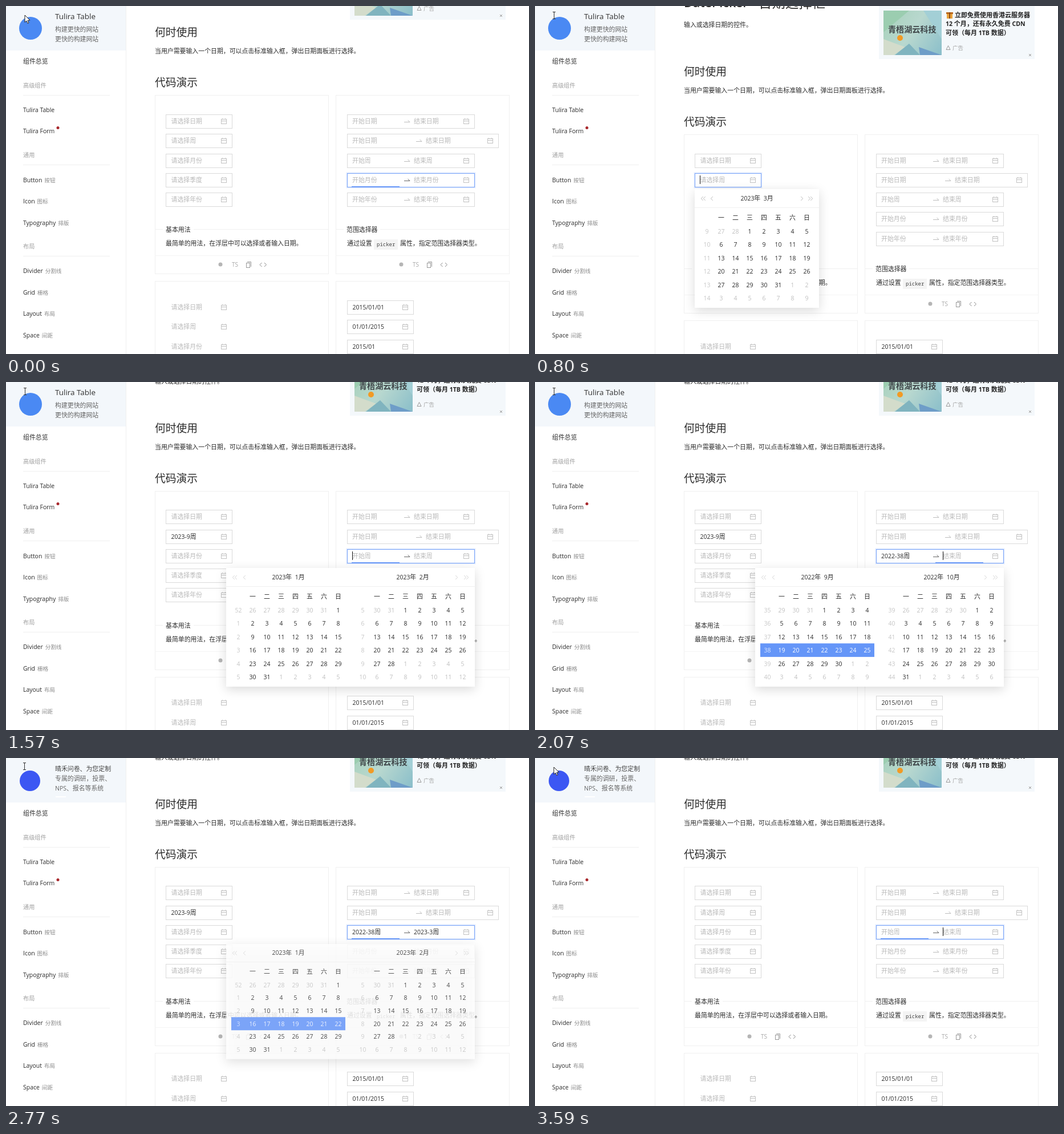
These frames come from a looping animation (917x610 px, 4190 ms). An HTML page with a canvas:

```html
<!DOCTYPE html>
<html lang="zh-CN">
<head>
<meta charset="utf-8">
<title>Date picker demo</title>
<style>
html, body { margin: 0; width: 100%; height: 100%; overflow: hidden; background: #fff; }
canvas { display: block; width: 917px; height: 610px; }
</style>
</head>
<body>
<canvas id="stage" width="917" height="610"></canvas>
<script>
const ctx = document.getElementById('stage').getContext('2d');
const LOOP = 4190;
const SANS = '"Open Sans","Noto Sans CJK SC","Noto Sans CJK",sans-serif';
const CJK = '"Noto Sans CJK SC","Noto Sans CJK","Noto Sans CJK JP",sans-serif';
const MONO = '"Noto Sans Mono","DejaVu Sans Mono",monospace';
const INK = '#2b2b2b', HINT = '#b9b9b9', BLUE = '#6596f8', LINE = '#f0f0f0', ICON = '#c2c2c2';
const BODY = 10.9;

// Each step changes a part of the state and holds until the next one.
const steps = [
  [0, { scroll: 68.6, focus: 'R3', part: 0, caret: '', hover: 'none', week: '', from: '', to: '',
        pop: '', alpha: 1, squash: 1, month: 0, row: -1, mark: 'hover', arrow: true, cy: 16 }],
  [500, { scroll: 0, caret: 'end', hover: 'R1', arrow: false }],
  [600, { focus: 'L1', caret: 'left', hover: 'none' }],
  [700, { pop: 'single', alpha: .6, squash: .92, month: 2 }],
  [800, { alpha: 1, squash: 1 }],
  [950, { row: 0 }],
  [1050, { week: '2023-9周', mark: 'pick' }],
  [1150, { alpha: .87, squash: .97 }],
  [1250, { pop: '', caret: '' }],
  [1370, { scroll: 34.3 }],
  [1470, { hover: 'R2' }],
  [1570, { focus: 'R2', caret: 'start', hover: 'none', pop: 'range', alpha: 1, squash: 1, month: 0, row: -1, mark: 'hover' }],
  [1670, { month: -2 }],
  [1770, { month: -4 }],
  [1870, { row: 3, from: '2022-38周' }],
  [1970, { mark: 'pick' }],
  [2070, { part: 1, caret: 'end' }],
  [2170, { month: -3, row: -1 }],
  [2270, { month: -2 }],
  [2370, { month: -1 }],
  [2470, { month: 0, row: 1, mark: 'edge', to: '2023-1周' }],
  [2570, { row: 3, to: '2023-3周' }],
  [2670, { mark: 'pick', part: 0, caret: '' }],
  [2770, { alpha: .85, squash: .97, cy: 14 }],
  [2870, { pop: '' }],
  [2970, { scroll: 0 }],
  [3090, { hover: 'L0' }],
  [3190, { hover: 'L1' }],
  [3290, { scroll: 34.3, week: '' }],
  [3390, { hover: 'none', from: '', to: '' }],
  [3590, { caret: 'end', arrow: true, cy: 16 }]
];

let s, Y;

function rect(x, y, w, h, color) {
  ctx.fillStyle = color;
  ctx.fillRect(x, y, w, h);
}

function path(color, pts, width = 1, fill) {
  ctx.beginPath();
  pts.forEach(([x, y], i) => i ? ctx.lineTo(x, y) : ctx.moveTo(x, y));
  if (fill) {
    ctx.fillStyle = color;
    ctx.fill();
  } else {
    ctx.strokeStyle = color;
    ctx.lineWidth = width;
    ctx.stroke();
  }
}

function dot(x, y, r, color) {
  ctx.fillStyle = color;
  ctx.beginPath();
  ctx.arc(x, y, r, 0, 7);
  ctx.fill();
}

function frame(x, y, w, h, color) {
  ctx.strokeStyle = color;
  ctx.lineWidth = 1;
  ctx.strokeRect(x + .5, y + .5, w - 1, h - 1);
}

// Latin runs are set a little smaller than the Chinese ones.
function runs(str, size, weight) {
  return (str.match(/[\u2e80-\uffef]+|[^\u2e80-\uffef]+/g) || []).map(part => {
    const wide = part.charCodeAt(0) > 0x2e7f;
    const font = `${weight} ${wide ? size : size * .96}px ${wide ? CJK : SANS}`;
    ctx.font = font;
    return { part, font, width: ctx.measureText(part).width };
  });
}

function text(str, x, y, color = INK, size = BODY, weight = 400, align = 0) {
  const list = runs(str, size, weight);
  const total = list.reduce((sum, r) => sum + r.width, 0);
  x -= total * align;
  ctx.fillStyle = color;
  for (const r of list) {
    ctx.font = r.font;
    ctx.fillText(r.part, x, y + size * .37);
    x += r.width;
  }
  return x;
}

function calendarIcon(x, y) {
  frame(x, y - 4, 10, 9, ICON);
  rect(x + 1, y - 1, 8, 1, ICON);
  rect(x + 2, y - 5, 1, 2, ICON);
  rect(x + 7, y - 5, 1, 2, ICON);
}

function box(x, y, w, id) {
  const on = s.focus === id;
  if (on) {
    ctx.strokeStyle = 'rgba(101,150,248,.18)';
    ctx.lineWidth = 1.5;
    ctx.strokeRect(x - .7, y - .7, w + 1.4, 26.4);
  }
  rect(x, y, w, 25, '#fff');
  frame(x, y, w, 25, on ? '#76a2f8' : s.hover === id ? '#b3c8e2' : '#dadada');
}

const caret = (x, y) => rect(Math.round(x), y - 8, 1, 15, '#111');

function single(x, y, id, hint, value, bare) {
  const cy = y + 12;
  const on = s.focus === id;
  if (!bare) box(x, y, 117, id);
  const end = text(value || hint, x + 9.5, cy, value ? INK : HINT);
  if (on && s.caret === 'left') caret(value ? end : x + 9, cy);
  if (on && value) {
    dot(x + 101.5, cy + .5, 5.5, '#a8a8a8');
    path('#fff', [[x + 99.5, cy - 1.5], [x + 103.5, cy + 2.5]]);
    path('#fff', [[x + 103.5, cy - 1.5], [x + 99.5, cy + 2.5]]);
  } else calendarIcon(x + 97, cy);
}

function range(y, id, unit, w, from, to) {
  const x = 598, cy = y + 12, on = s.focus === id;
  const mid = w > 230 ? 719 : 698, right = mid + 17;
  box(x, y, w, id);
  const a = text(from || '开始' + unit, x + 9, cy, from ? INK : HINT);
  const b = text(to || '结束' + unit, right, cy, to ? INK : HINT);
  path(on ? '#666' : '#bdbdbd', [[mid, cy + 1.5], [mid + 10, cy + 1.5], [mid + 6.5, cy - 2]]);
  calendarIcon(x + w - 20, cy);
  if (!on) return;
  rect(s.part ? 702 : 606, y + 23, 84, 2, BLUE);
  if (s.caret === 'start') caret(from ? a : x + 9, cy);
  if (s.caret === 'end') caret(to ? b : right, cy);
}

function footer(x, y) {
  dot(x, y, 3.5, '#b5b5b5');
  text('TS', x + 20, y, '#a8a8a8', 10.5);
  frame(x + 45, y - 3, 7, 9, '#999');
  path('#999', [[x + 47, y - 4.5], [x + 53.5, y - 4.5], [x + 53.5, y + 4]]);
  path('#888', [[x + 72.5, y - 3], [x + 69, y + .5], [x + 72.5, y + 4]]);
  path('#888', [[x + 77, y - 3], [x + 80.5, y + .5], [x + 77, y + 4]]);
}

function card(x, y, title) {
  frame(x, y, 305, 314, LINE);
  if (!title) return;
  rect(x, y + 235, 14, 1, LINE);
  const end = text(title, x + 19, y + 236);
  const next = Math.round(end + 5);
  rect(next, y + 235, x + 305 - next, 1, LINE);
  rect(x, y + 281, 305, 1, '#f4f4f4');
  footer(x + 115, y + 297);
}

function advert() {
  const y = Y(0);
  rect(603, y - 4, 273, 97, '#f4f8fb');
  ctx.save();
  ctx.translate(611, y + 8);
  ctx.beginPath();
  ctx.rect(0, 0, 102, 78);
  ctx.clip();
  const g = ctx.createLinearGradient(0, 0, 102, 70);
  g.addColorStop(0, '#a5d0b9');
  g.addColorStop(.5, '#b9d8cf');
  g.addColorStop(1, '#8dc0ca');
  rect(0, 0, 102, 78, g);
  path('#9bcdb0', [[0, 0], [45, 0], [0, 38]], 1, true);
  path('#a3cfd6', [[70, 0], [102, 0], [102, 50]], 1, true);
  path('#d3dccb', [[0, 50], [38, 64], [18, 78], [0, 78]], 1, true);
  path('#80b4bf', [[20, 78], [45, 58], [64, 78]], 1, true);
  path('#6e9dc8', [[62, 64], [102, 78], [64, 78]], 1, true);
  ctx.restore();
  text('青梧湖云科技', 619, y + 41, '#3f4649', 14.1, 700);
  dot(640, y + 56, 5, '#f29a24');
  rect(722, y + 12, 10, 10, '#e9a23b');
  rect(721, y + 11, 12, 3, '#b9671d');
  rect(726, y + 11, 2, 11, '#8a4a18');
  text('立即免费使用香港云服务器', 736, y + 16, '#222', 11, 700);
  text('12 个月，还有永久免费 CDN', 720, y + 31, '#222', 11, 700);
  text('可领（每月 1TB 数据）', 720, y + 47, '#222', 11, 700);
  path('#999', [[721, y + 76.5], [724.5, y + 69.5], [728, y + 76.5], [721, y + 76.5]]);
  text('广告', 732, y + 73, '#a5a5a5', 9.5);
  path('#999', [[866, y + 84], [870, y + 88]]);
  path('#999', [[870, y + 84], [866, y + 88]]);
}

function page() {
  Y = y => Math.round(y - s.scroll);
  const top = (base, i) => Math.floor(base + 34 + 34.3 * i - s.scroll);
  text('DatePicker', 261, Y(-6), INK, 22.4, 600);
  text('日期选择框', 392, Y(-6), INK, 23.4, 500);
  text('输入或选择日期的控件。', 261, Y(33));
  text('何时使用', 261, Y(115), INK, 18.8);
  text('当用户需要输入一个日期，可以点击标准输入框，弹出日期面板进行选择。', 261, Y(148));
  text('代码演示', 261, Y(203), INK, 18.8);
  advert();

  card(261, Y(225), '基本用法');
  text('最简单的用法，在浮层中可以选择或者输入日期。', 280, Y(485));
  card(578, Y(225), '范围选择器');
  text('通过设置', 598, Y(485));
  rect(645, Y(478), 42, 18, '#f4f4f4');
  ctx.font = '9px ' + MONO;
  ctx.fillStyle = '#444';
  ctx.fillText('picker', 650, Y(490));
  text('属性，指定范围选择器类型。', 691, Y(485));

  ['日期', '周', '月份', '季度', '年份'].forEach((unit, i) =>
    single(280, top(225, i), 'L' + i, '请选择' + unit, i === 1 ? s.week : ''));
  ['日期', '日期', '周', '月份', '年份'].forEach((unit, i) => {
    const own = i === 2;
    range(top(225, i), 'R' + i, unit, i === 1 ? 266 : 224, own ? s.from : '', own ? s.to : '');
  });

  card(261, Y(551));
  card(578, Y(551));
  ['日期', '周', '月份'].forEach((unit, i) => single(280, top(551, i), 'B' + i, '请选择' + unit, '', true));
  ['2015/01/01', '01/01/2015', '2015/01'].forEach((v, i) => single(598, top(551, i), 'F' + i, '', v));
}

function isoWeek(y, m, d) {
  const thu = new Date(y, m, d + 3);
  return 1 + Math.floor(Math.round((thu - new Date(thu.getFullYear(), 0, 1)) / 864e5) / 7);
}

function chevrons(x, y, n, dir, color) {
  for (let i = 0; i < n; i++) {
    const px = x + (n > 1 ? i * 4 - 2 : 0);
    path(color, [[px - dir * 1.8, y - 3.5], [px + dir * 1.8, y], [px - dir * 1.8, y + 3.5]]);
  }
}

function panel(x, y, month, active) {
  const first = new Date(2023, month, 1);
  const year = first.getFullYear(), m = first.getMonth();
  const lead = (first.getDay() + 6) % 7;
  text(`${year}年  ${m + 1}月`, x + 109, y + 16, INK, BODY, 400, .5);
  rect(x, y + 32, 218, 1, LINE);
  [...'一二三四五六日'].forEach((d, i) => text(d, x + 46.5 + 25 * i, y + 50, INK, BODY, 400, .5));
  const strong = s.mark !== 'hover';
  for (let r = 0; r < 6; r++) {
    const cy = y + 74 + 23.4 * r;
    const on = active && r === s.row;
    const start = 1 - lead + 7 * r;
    if (on) rect(x + 9, cy - 12, 200, 23.7, { hover: '#f3f3f3', edge: '#bdd0fb', pick: BLUE }[s.mark]);
    else if (active && s.pop === 'range' && s.part && month === 0 && r < s.row)
      rect(x + 34, cy - 9.4, 175, 18.8, '#f4f7f6');
    text('' + isoWeek(year, m, start), x + 21.5, cy, on && strong ? '#dfe9ff' : '#c6c6c6', BODY, 400, .5);
    for (let c = 0; c < 7; c++) {
      const day = new Date(year, m, start + c);
      const color = on && strong ? '#fff' : day.getMonth() === m ? INK : '#c0c0c0';
      text('' + day.getDate(), x + 46.5 + 25 * c, cy, color, BODY, 400, .5);
    }
  }
}

function popup() {
  if (!s.pop) return;
  const wide = s.pop === 'range';
  const x = wide ? 386 : 280, w = wide ? 436 : 218;
  ctx.save();
  ctx.globalAlpha = s.alpha;
  ctx.translate(0, wide ? 326 : 321);
  ctx.scale(1, s.squash);
  ctx.shadowColor = 'rgba(0,0,0,.15)';
  ctx.shadowBlur = 18;
  ctx.shadowOffsetY = 5;
  rect(x, 0, w, 208, '#fff');
  ctx.shadowColor = 'transparent';
  panel(x, 0, s.month, true);
  if (wide) panel(x + 218, 0, s.month + 1, false);
  const color = wide ? '#d4d4d4' : '#bbb', gap = wide ? 32 : 30;
  chevrons(x + 15, 16.5, 2, -1, color);
  chevrons(x + gap, 16.5, 1, -1, color);
  chevrons(x + w - gap, 16.5, 1, 1, color);
  chevrons(x + w - 15, 16.5, 2, 1, color);
  ctx.restore();
}

function banner(now) {
  const p = Math.min(1, Math.max(0, (now - 2370) / 300));
  const off = 210 * Math.pow(1 - p, 2.77);
  rect(0, 0, 210, 78, '#f3f7fb');
  ctx.save();
  ctx.beginPath();
  ctx.rect(0, 0, 210, 78);
  ctx.clip();
  ctx.translate(off - 210, 0);
  dot(43, 39, 20, '#4a89f3');
  text('Tulira Table', 86, 18, '#333', 14);
  text('构建更快的网站', 86, 41, '#666');
  text('更快的构建网站', 86, 58, '#666');
  ctx.translate(210, 0);
  dot(42, 40, 18, '#3c57f3');
  text('晴禾问卷、为您定制', 86, 19, '#444', BODY, 500);
  text('专属的调研，投票、', 86, 36, '#666');
  text('NPS、报名等系统', 86, 53, '#666');
  rect(87, 67, 18, 2, '#fff');
  ctx.restore();
}

function sidebar(now) {
  rect(0, 0, 210, 610, '#fff');
  rect(210, 0, 1, 610, LINE);
  banner(now);
  text('组件总览', 30, 97);
  [['高级组件', 139], ['通用', 261], ['布局', 421]].forEach(([name, y]) => {
    text(name, 30, y, '#a0a0a0', 10.2);
    rect(30, y + 17, 152, 1, '#efefef');
  });
  text('Tulira Table', 30, 182);
  text('Tulira Form', 30, 219);
  dot(91, 213.5, 2.5, '#a8272b');
  [['Button', '按钮', 305], ['Icon', '图标', 342], ['Typography', '排版', 380], ['Divider', '分割线', 464],
   ['Grid', '栅格', 502], ['Layout', '布局', 539], ['Space', '间距', 577]].forEach(([en, zh, y]) => {
    const end = text(en, 30, y);
    text(zh, end + 4, y, '#8a8a8a', 9.6);
  });
}

function pointer() {
  const y = s.cy;
  if (s.arrow) {
    const shape = [[33, y], [33, y + 12.5], [36, y + 10], [38, y + 14.5], [40, y + 13.5],
                   [38, y + 9.3], [42, y + 9], [33, y]];
    path('#fff', shape, 1, true);
    path('#222', shape, 1);
    return;
  }
  const x = y < 16 ? 32 : 33;
  rect(x, y - 5, 1, 11, '#333');
  rect(x - 2, y - 6, 5, 1, '#333');
  rect(x - 2, y + 6, 5, 1, '#333');
}

function draw(t) {
  const past = steps.filter(step => step[0] <= t);
  s = Object.assign({}, ...past.map(step => step[1]));
  const now = past[past.length - 1][0];
  rect(0, 0, 917, 610, '#fff');
  page();
  popup();
  sidebar(now);
  pointer();
}

function tick() {
  draw(performance.now() % LOOP);
  requestAnimationFrame(tick);
}
tick();
</script>
</body>
</html>
```
